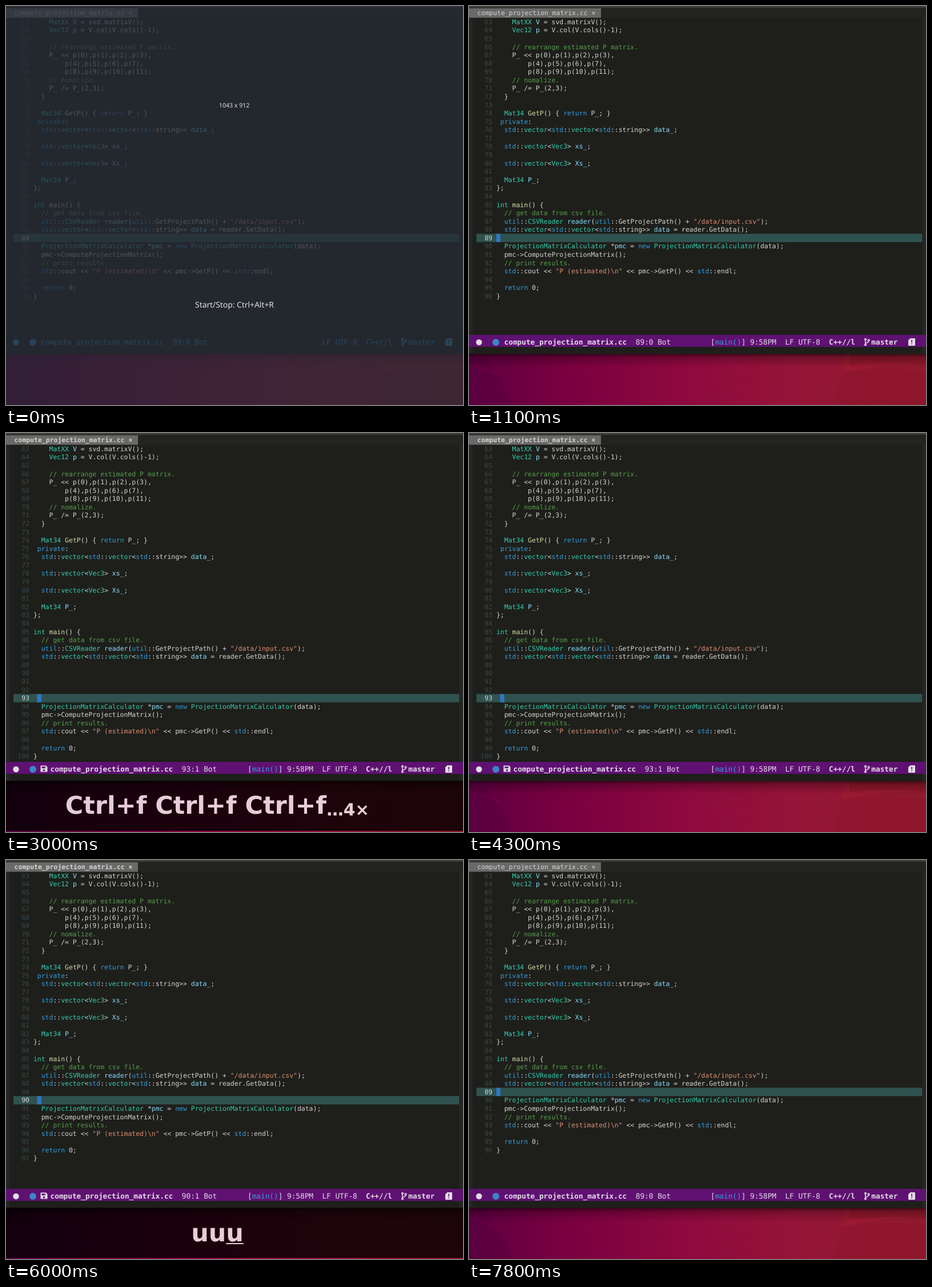
Recreate the animation shown at these times as an HTML page. Size 800 by 700 pixels, loop 8000 ms.

```html
<!DOCTYPE html>
<html lang="en">
<head>
<meta charset="utf-8">
<title>Editor session</title>
<style>
  html, body { margin: 0; width: 100%; height: 100%; overflow: hidden; background: #1e1f1b; }
  svg { display: block; width: 800px; height: 700px; }
  text { white-space: pre; text-rendering: geometricPrecision; }
  .code { font: 11.466px "DejaVu Sans Mono", monospace; fill: #d4d4d4; }
  .t { fill: #35cdaf; }
  .k { fill: #339cdb; }
  .v { fill: #85ddff; }
  .f { fill: #d9daa2; }
  .s { fill: #db8e73; }
  .c { fill: #579c4c; }
  .num { fill: #37474f; text-anchor: end; }
  .num.now { fill: #d4d4d4; }
  .bar { font: 12.74px "DejaVu Sans Mono", monospace; fill: #339cdb; color: #339cdb; }
  .bar .ic { fill: currentColor; }
  .bar .bg { fill: #1f201d; }
  .bar.on { fill: #e2dde6; color: #e2dde6; }
  .bar.on .bg { fill: #5f1172; }
  .bar.on .b { font-weight: bold; }
  .keys { font: bold 42.9px "DejaVu Sans", sans-serif; fill: #fff; }
  .hint { font-family: "Noto Sans", "Open Sans", sans-serif; fill: #e4e4e4; text-anchor: middle; }
</style>
</head>
<body>
<svg viewBox="0 0 800 700" xmlns="http://www.w3.org/2000/svg">
  <defs>
    <linearGradient id="wall" gradientUnits="userSpaceOnUse" x1="0" y1="680" x2="800" y2="630">
      <stop offset="0" stop-color="#5c0041"/>
      <stop offset=".2" stop-color="#780040"/>
      <stop offset=".45" stop-color="#8c083f"/>
      <stop offset=".7" stop-color="#951438"/>
      <stop offset="1" stop-color="#8f1a2c"/>
    </linearGradient>
    <linearGradient id="shade" x1="0" y1="0" x2="0" y2="1">
      <stop offset="0" stop-color="#000" stop-opacity=".55"/>
      <stop offset=".3" stop-color="#000" stop-opacity=".22"/>
      <stop offset="1" stop-color="#000" stop-opacity="0"/>
    </linearGradient>
  </defs>

  <rect y="608" width="800" height="92" fill="url(#wall)"/>
  <path d="M0 625L28 614L78 700H0Z" fill="#50003c" opacity=".25"/>
  <path d="M0 628L54 646" stroke="#a00058" stroke-width="2" opacity=".25"/>
  <path d="M512 610V700H300L390 610Z" fill="#a01040" opacity=".1"/>
  <path d="M653 644L660 610H800V629Q720 626 653 644Z" fill="#a81c30" opacity=".4"/>
  <path d="M666 610V631Q730 622 800 629V610Z" fill="#861628" opacity=".55"/>
  <path d="M653 644Q720 632 800 642V700H640Z" fill="#8a1228" opacity=".3"/>
  <rect id="shadow" y="610" width="800" height="24" fill="url(#shade)"/>

  <rect width="800" height="610.5" fill="#1e1f1b"/>
  <path d="M0 20H6.5V610H0ZM793.3 20H800V610H793.3Z" fill="#242524"/>
  <rect id="line" x="13" width="780.3" height="14.6" fill="#30524f"/>
  <rect id="cursor" width="6.9" height="14" stroke="#2e77c3"/>
  <g id="nums" class="code"></g>
  <g id="head" class="code"></g>
  <g id="tail" class="code"></g>

  <rect width="800" height="20.6" fill="#232422"/>
  <rect width="800" height="3" fill="#3e3e38"/>
  <rect y="4" width="231" height="16.6" fill="#696a68"/>
  <text id="tab" class="code" x="14.6" y="16.2">compute_projection_matrix.cc ×</text>

  <g id="bar" class="bar">
    <rect class="bg" y="577" width="800" height="21"/>
    <circle class="ic" cx="17.5" cy="590" r="5.2"/>
    <circle cx="47" cy="590" r="6" fill="#3b86c4"/>
    <path id="save" class="ic" fill-rule="evenodd" d="M61 583.5H70L72.5 586V594.5H60.5V584ZM62.5 585.2V588.2H69V585.2ZM66.5 590A1.8 1.8 0 1 0 66.5 593.6A1.8 1.8 0 1 0 66.5 590Z"/>
    <g id="name">
      <text class="b" x="61.6" y="593.5">compute_projection_matrix.cc</text>
      <text id="pos" x="291.8" y="593.5"></text>
    </g>
    <text id="scope" x="423" y="593.5">[<tspan class="k">main()</tspan>]</text>
    <text id="clock" x="492" y="593.5">9:58PM</text>
    <text x="553.4" y="593.5">LF UTF-8</text>
    <text class="b" x="630" y="593.5">C++//l</text>
    <g fill="none" stroke="currentColor" stroke-width="1.5">
      <circle cx="694" cy="585" r="1.4"/>
      <circle cx="694" cy="594.3" r="1.4"/>
      <circle cx="699.6" cy="586.5" r="1.4"/>
      <path d="M694 586.5V593M699.6 588Q699.6 590.4 694 591.5"/>
    </g>
    <text class="b" x="704.3" y="593.5">master</text>
    <path class="ic" fill-rule="evenodd" d="M772.5 583H780Q781 583 781 584V595Q781 596 780 596H770Q769 596 769 595V586.5ZM774.3 585.5V590.5H775.9V585.5ZM774.3 592V593.6H775.9V592Z"/>
  </g>

  <g id="keys" class="keys" opacity=".8">
    <rect y="610" width="800" height="88" fill="#000"/>
    <text id="typed"></text>
    <text id="more" font-size="29.6" y="671.3">…4×</text>
    <rect id="under" height="2"/>
  </g>

  <g id="intro">
    <rect width="800" height="700" fill="#262b35" opacity=".76"/>
    <text class="hint" x="399.6" y="178" font-size="10.6">1043 x 912</text>
    <text class="hint" x="400" y="528.6" font-size="13.85">Start/Stop: Ctrl+Alt+R</text>
  </g>
</svg>
<script>
const FIRST = 63, CELL = 6.903, ROW = 14.573, LEFT = 47.9, TOP = 20.7;
const LOOP = 8000, EM = 42.9, MID = 370, MORE = 75;

// x[text] colours text with class x
const source = String.raw`    t[MatXX] v[V] = svd.matrixV();
    t[Vec12] v[p] = V.col(V.cols()-1);

    c[// rearrange estimated P matrix.]
    P_ << p(0),p(1),p(2),p(3),
        p(4),p(5),p(6),p(7),
        p(8),p(9),p(10),p(11);
    c[// nomalize.]
    P_ /= P_(2,3);
  }

  t[Mat34] f[GetP]() { k[return] P_; }
 k[private]:
  k[std]::t[vector]<k[std]::t[vector]<k[std]::string>> v[data_];

  k[std]::t[vector]<t[Vec3]> v[xs_];

  k[std]::t[vector]<t[Vec3]> v[Xs_];

  t[Mat34] v[P_];
};

t[int] f[main]() {
  c[// get data from csv file.]
  k[util]::t[CSVReader] v[reader](k[util]::GetProjectPath() + s["/data/input.csv"]);
  k[std]::t[vector]<k[std]::t[vector]<k[std]::string>> v[data] = reader.GetData();

  t[ProjectionMatrixCalculator] *v[pmc] = k[new] t[ProjectionMatrixCalculator](data);
  pmc->ComputeProjectionMatrix();
  c[// print results.]
  k[std]::cout << s["P (estimated)\n"] << pmc->GetP() << k[std]::endl;

  k[return] 0;
}`.split("\n");

// time, added lines, key, presses, underlined
const steps = [
  [0, 0, "", 0, 0],
  [2000, 0, "Ctrl+f", 1, 1],
  [2100, 1, "Ctrl+f", 1, 1],
  [2200, 1, "Ctrl+f", 1, 0],
  [2300, 1, "Ctrl+f", 2, 1],
  [2400, 2, "Ctrl+f", 2, 1],
  [2500, 2, "Ctrl+f", 3, 1],
  [2600, 3, "Ctrl+f", 3, 1],
  [2700, 3, "Ctrl+f", 4, 1],
  [2800, 4, "Ctrl+f", 4, 1],
  [3000, 4, "Ctrl+f", 4, 0],
  [4300, 4, "", 0, 0],
  [4900, 4, "u", 1, 1],
  [5100, 4, "u", 1, 0],
  [5300, 3, "u", 1, 0],
  [5600, 3, "u", 2, 1],
  [5700, 2, "u", 2, 1],
  [5800, 2, "u", 2, 0],
  [6000, 1, "u", 3, 1],
  [6200, 1, "u", 3, 0],
  [6400, 1, "u", 4, 1],
  [6500, 0, "u", 4, 0],
  [7800, 0, "", 0, 0]
];

const $ = id => document.getElementById(id);
const rowTop = n => TOP + (n - FIRST) * ROW;
const esc = s => s.replace(/&/g, "&amp;").replace(/</g, "&lt;");
const show = (id, on) => { $(id).style.display = on ? "" : "none"; };
const set = (id, attrs) => {
  for (const k in attrs) $(id).setAttribute(k, attrs[k]);
};

function codeLine(line, i) {
  const indent = line.search(/\S/);
  if (indent < 0) return "";
  const parts = line.trim().split(/([tkvfsc])\[(.*?)\]/);
  let out = "";
  for (let j = 0; j < parts.length; j += 3) {
    out += esc(parts[j]);
    if (parts[j + 1]) out += `<tspan class="${parts[j + 1]}">${esc(parts[j + 2])}</tspan>`;
  }
  const y = rowTop(FIRST + i) + 11.2;
  return `<text x="${LEFT + indent * CELL}" y="${y}">${out}</text>`;
}

const lines = source.map(codeLine);
$("head").innerHTML = lines.slice(0, 26).join("");
$("tail").innerHTML = lines.slice(26).join("");
$("nums").innerHTML = Array.from({ length: 38 }, (_, i) =>
  `<text class="num" x="${LEFT - CELL}" y="${rowTop(FIRST + i) + 11.2}">${FIRST + i}</text>`).join("");
const nums = [...$("nums").children];

function drawEditor(added, focused) {
  const row = 89 + added, col = added ? 1 : 0, y = rowTop(row);
  set("tail", { transform: `translate(0 ${added * ROW})` });
  set("line", { y });
  set("cursor", {
    x: LEFT + col * CELL, y: y + 0.3,
    fill: focused ? "#2e77c3" : "none", "stroke-width": focused ? 0.4 : 0.8
  });
  nums.forEach((el, i) => {
    el.classList.toggle("now", FIRST + i === row);
    el.style.display = FIRST + i > 96 + added ? "none" : "";
  });
  $("tab").style.fontWeight = added ? "bold" : "normal";
  $("pos").textContent = `${row}:${col} Bot`;
  set("name", { transform: `translate(${added ? 16 : 0} 0)` });
  show("save", added);
}

function drawKeys(key, count, underlined) {
  show("keys", count);
  if (!count) return;
  const gap = key === "u" ? 0 : 0.348 * EM;
  const unit = (key === "u" ? 0.712 : 3.321) * EM;
  const shown = Math.min(count, 3), many = count > 3;
  const main = shown * unit + (shown - 1) * gap;
  const width = main + (many ? MORE : 0), left = MID - width / 2;
  $("typed").textContent = Array(shown).fill(key).join(gap ? " " : "");
  set("typed", { x: left, y: many ? 667.8 : 669.3 });
  show("more", many);
  set("more", { x: left + main });
  const last = many ? MORE : unit;
  show("under", underlined);
  set("under", { x: left + width - last, y: many ? 674 : 672, width: last, fill: "#fff" });
}

let drawn = "";
function draw(t) {
  const step = steps.filter(s => s[0] <= t).pop();
  const intro = t < 100, focused = t >= 900, scoped = t >= 1000;
  const state = [step[0], intro, focused, scoped].join();
  if (state === drawn) return;
  drawn = state;
  show("intro", intro);
  $("bar").classList.toggle("on", focused);
  show("clock", focused);
  show("scope", scoped);
  set("shadow", { opacity: focused ? 1 : 0.7 });
  drawEditor(step[1], focused);
  drawKeys(step[2], step[3], step[4]);
}

const start = performance.now();
function tick() {
  draw((performance.now() - start) % LOOP);
  requestAnimationFrame(tick);
}
tick();
</script>
</body>
</html>
```
